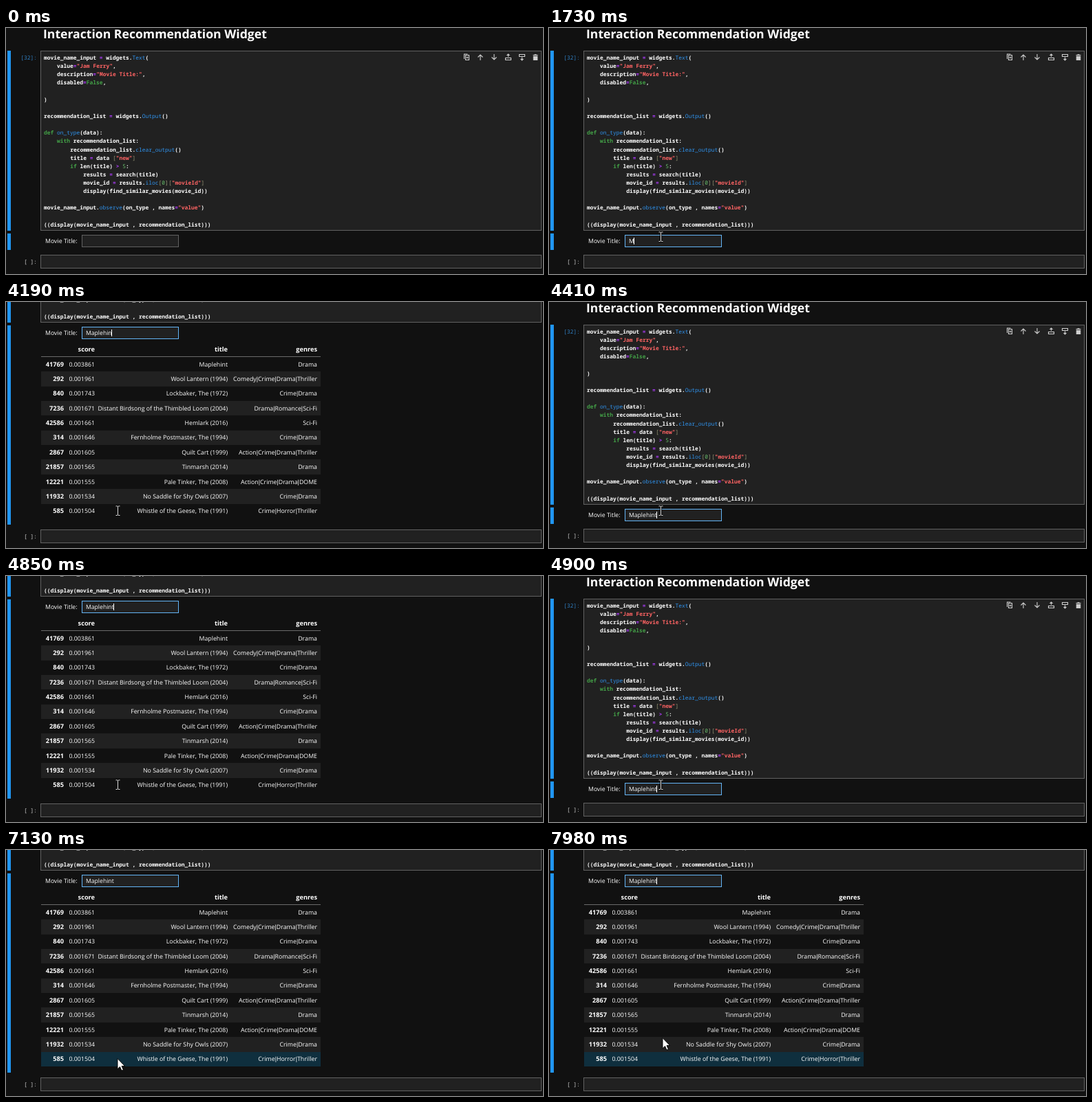
Write an HTML page that moves like this. It is 780 px wide and 358 px high and loops after 8 s.

```html
<!DOCTYPE html>
<html lang="en">
<head>
<meta charset="utf-8">
<title>Recommendation widget</title>
<style>
  html, body { margin: 0; width: 100%; height: 100%; overflow: hidden; background: #111; }
  svg { display: block; width: 780px; height: 358px; }
  text { white-space: pre; text-rendering: geometricPrecision; fill: #fff; font: 8.8px "Open Sans", "Noto Sans", sans-serif; }
  rect, line { shape-rendering: crispEdges; }
  .title { font-size: 17.62px; font-weight: 700; }
  .mono { font: 600 7.93px "Noto Sans Mono", "DejaVu Sans Mono", monospace; }
  .prompt { font-weight: 400; text-anchor: end; fill: #d0d0d0; }
  .done { fill: #307fc1; }
  .str { fill: #ff6464; }
  .key { fill: #43a047; }
  .num { fill: #66bb6a; font-weight: 400; }
  .prop { fill: #2f93ee; font-weight: 400; }
  .op { fill: #b03cff; }
  .sq { fill: #9a9a78; font-weight: 400; }
  .box { fill: #212121; stroke: #616161; }
  .focus { stroke: #64b5f6; }
  .bar { fill: #2196f3; }
  .icons { fill: none; stroke: #cfcfcf; stroke-width: 1.1; }
  #typed { font-size: 8.65px; }
  #table text { text-anchor: end; }
  #table .b { font-weight: 700; font-size: 9.2px; }
  .pipe { font-family: "Liberation Sans", sans-serif; }
  .odd { fill: #212121; }
  .hover { fill: #0f2f3e; }
</style>
</head>
<body>
<svg viewBox="0 0 780 358">
  <g id="page">
    <text class="title" x="54" y="15">Interaction Recommendation Widget</text>
    <rect class="bar" x="2" y="33" width="5" height="262"/>
    <rect class="box" x="50.5" y="33.5" width="727" height="261"/>
    <text class="mono prompt done" x="45" y="46">[32]:</text>
    <g id="code"></g>
    <g class="icons">
      <path d="M667.5 39.5h5v7h-5zM665.5 45v-7h5M668.5 43h3M670 41.5v3"/>
      <path d="M689 47v-8M685.5 42.5l3.5-3.5l3.5 3.5"/>
      <path d="M709 38v8M705.5 42.5l3.5 3.5l3.5-3.5"/>
      <path d="M725.5 43.5h8v3h-8zM729.5 42v-4M727.5 40l2-2l2 2"/>
      <path d="M745.5 38.5h8v3h-8zM749.5 42.5v5M747.5 45l2 2l2-2"/>
      <path d="M765.5 39.5h7M767.5 38.7h3"/>
      <path d="M766.3 41.3h5.4v5.2h-5.4z" fill="#cfcfcf"/>
    </g>
    <rect id="outbar" class="bar" x="2" y="299" width="5" height="24"/>
    <text x="57" y="313">Movie Title:</text>
    <rect id="field" class="box" x="110.5" y="301.5" width="140" height="17"/>
    <text id="typed" x="116" y="313"></text>
    <rect id="caret" y="305" width="1" height="10" fill="#fff"/>
  </g>
  <g id="table">
    <line x1="51" x2="457" y1="79.5" y2="79.5" stroke="#6a6a6a"/>
  </g>
  <g id="next">
    <rect class="box" x="50.5" y="330.5" width="727" height="19"/>
    <text class="mono prompt" x="45" y="342.5" font-weight="600">[ ]:</text>
  </g>
  <g id="beam" fill="none">
    <path d="M-3 -6.5h2.3l.7 .7l.7-.7h2.3M0 -6v12.5M-3 7h2.3l.7-.7l.7 .7h2.3" stroke="#000" stroke-width="2.4"/>
    <path d="M-3 -6.5h2.3l.7 .7l.7-.7h2.3M0 -6v12.5M-3 7h2.3l.7-.7l.7 .7h2.3" stroke="#e8e8e8"/>
  </g>
  <path id="arrow" d="M0 0v15.2l3.5-3.3l2.4 5.6l2.5-1.1l-2.4-5.4h4.6z" fill="#fff" stroke="#000" stroke-width=".9"/>
</svg>
<script>
const $ = id => document.getElementById(id);
const NS = "http://www.w3.org/2000/svg";

function add(parent, tag, attrs, content = "") {
  const el = document.createElementNS(NS, tag);
  for (const k in attrs) el.setAttribute(k, attrs[k]);
  el.textContent = content;
  parent.append(el);
  return el;
}

const source = `movie_name_input = widgets.Text(
    value="Jam Ferry",
    description="Movie Title:",
    disabled=False,

)

recommendation_list = widgets.Output()

def on_type(data):
    with recommendation_list:
        recommendation_list.clear_output()
        title = data ["new"]
        if len(title) > 5:
            results = search(title)
            movie_id = results.iloc[0]["movieId"]
            display(find_similar_movies(movie_id))

movie_name_input.observe(on_type , names="value")

((display(movie_name_input , recommendation_list)))`;

const tokens = /(?<str>"[^"]*")|(?<key>\b(?:def|with|if|False)\b)|(?<prop>(?<=\.)\w+|(?<=def )\w+)|(?<num>\b\d+\b)|(?<op>[=>])|(?<sq>[[\]])|(?<plain>\w+|[^\w])/g;

source.split("\n").forEach((line, i) => {
  const row = add($("code"), "text", { class: "mono", x: 55, y: 46.1 + 12.13 * i });
  for (const m of line.matchAll(tokens)) {
    const kind = Object.keys(m.groups).find(k => m.groups[k] !== undefined);
    add(row, "tspan", { class: kind }, m[0]);
  }
});

const query = "Maplehint";
const films = `41769;0.003861;${query};Drama
292;0.001961;Wool Lantern (1994);Comedy|Crime|Drama|Thriller
840;0.001743;Lockbaker, The (1972);Crime|Drama
7236;0.001671;Distant Birdsong of the Thimbled Loom (2004);Drama|Romance|Sci-Fi
42586;0.001661;Hemlark (2016);Sci-Fi
314;0.001646;Fernholme Postmaster, The (1994);Crime|Drama
2867;0.001605;Quilt Cart (1999);Action|Crime|Drama|Thriller
21857;0.001565;Tinmarsh (2014);Drama
12221;0.001555;Pale Tinker, The (2008);Action|Crime|Drama|DOME
11932;0.001534;No Saddle for Shy Owls (2007);Crime|Drama
585;0.001504;Whistle of the Geese, The (1991);Crime|Horror|Thriller`;
const edges = [84, 129, 322, 452];
const pitch = 21.35;

function cell(col, y, value, bold) {
  const el = add($("table"), "text", { x: edges[col], y, class: bold ? "b" : "" });
  value.split(/(\|)/).forEach(s => add(el, "tspan", { class: s === "|" ? "pipe" : "" }, s));
}

["", "score", "title", "genres"].forEach((name, col) => cell(col, 72.3, name, true));
let lastRow;
films.split("\n").forEach((film, i) => {
  const top = 80 + pitch * i;
  lastRow = add($("table"), "rect", { x: 51, y: top, width: 406, height: pitch, class: i % 2 ? "odd" : "", fill: "none" });
  film.split(";").forEach((value, col) => cell(col, top + 13.7, value, col === 0));
});

const LOOP = 8000, BLINK = 520, SCROLL = -265;
const keys = [1730, 2010, 2180, 2590, 3130, 3440, 3980, 4190, 4410];
const between = (t, a, b) => t >= a && t < b;
const show = (el, on) => el.setAttribute("visibility", on ? "visible" : "hidden");
const move = (el, x, y) => el.setAttribute("transform", `translate(${x} ${y})`);

function pointer(t) {
  if (t >= 7980) return [165, 273.5];
  if (t >= 7130) return [162, 303.5];
  const u = Math.min(1, Math.floor((t - 250) / 39) / 10);
  const left = (1 - u) ** 2;
  return [162.5 + 184.5 * left, 303.5 + 41 * left];
}

function draw(t) {
  const open = between(t, 4190, 4220) || between(t, 4850, 4900) || t >= 7070;
  const focused = t >= 850;
  const hover = t >= 7130;

  move($("page"), 0, open ? SCROLL : 0);
  move($("next"), 0, open ? 1 : 0);
  $("outbar").setAttribute("height", open ? 290 : 24);
  show($("table"), open);
  lastRow.setAttribute("class", hover ? "hover" : "");

  const typed = keys.filter(k => k <= t);
  const since = t - (typed.at(-1) ?? 850);
  $("typed").textContent = query.slice(0, typed.length);
  $("field").classList.toggle("focus", focused);
  const width = typed.length ? $("typed").getComputedTextLength() : 0;
  $("caret").setAttribute("x", Math.round(116 + width - 0.5));
  show($("caret"), focused && Math.floor(since / BLINK) % 2 === 0);

  const [x, y] = pointer(t);
  const overText = !hover && (y > 330 || x < 251);
  move($("beam"), x, y);
  move($("arrow"), x, y);
  show($("beam"), t >= 250 && overText);
  show($("arrow"), t >= 250 && !overText);
}

function tick() {
  draw(performance.now() % LOOP);
  requestAnimationFrame(tick);
}
tick();
</script>
</body>
</html>
```
